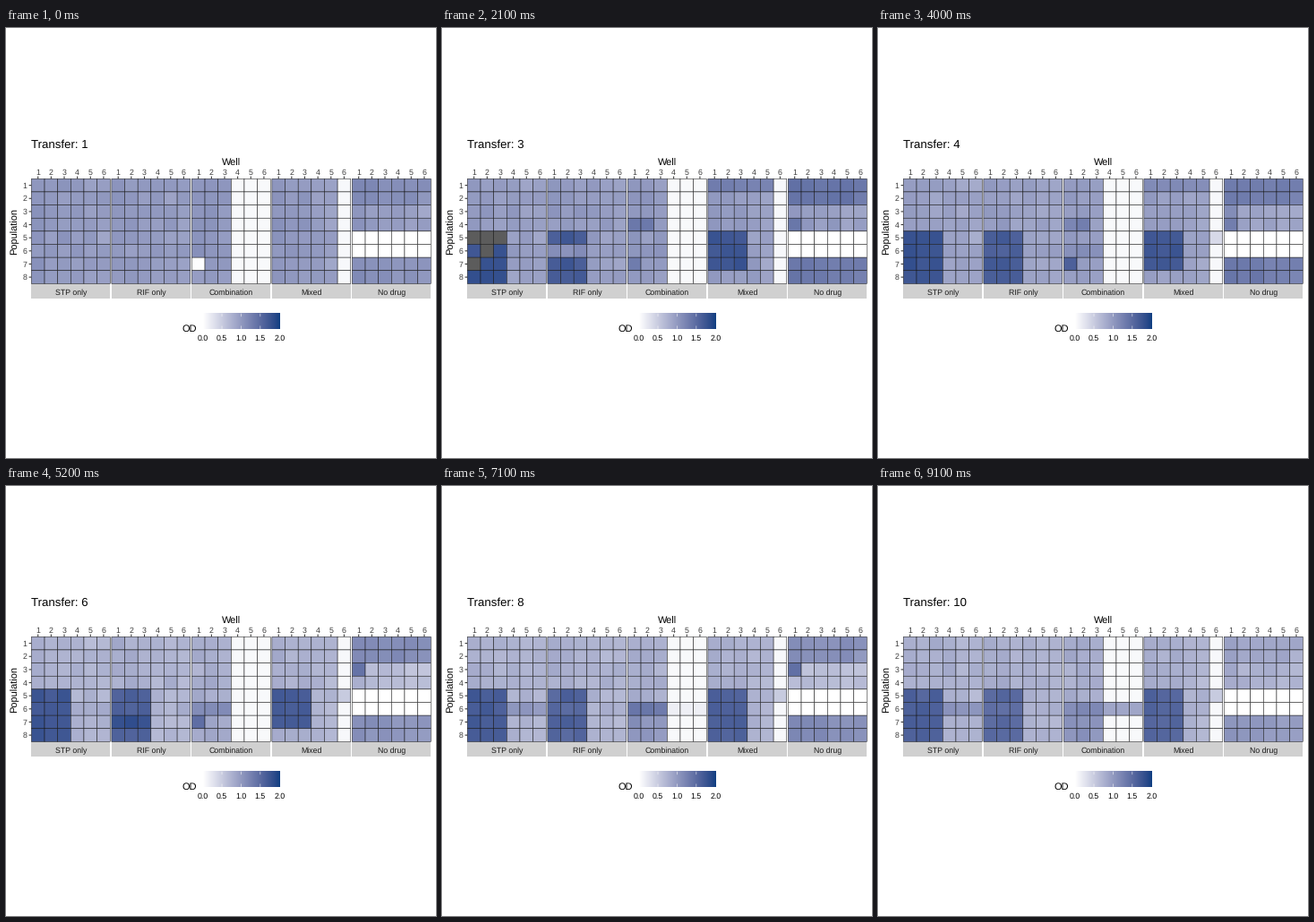
A matplotlib script for the animation above (10000 ms loop, 480x480 px).

```python
import numpy as np
import matplotlib.pyplot as plt
from matplotlib.animation import FuncAnimation
from matplotlib.collections import PolyCollection
from matplotlib.patches import Rectangle

plt.rcParams["font.family"] = "Liberation Sans"
plt.rcParams["text.hinting"] = "none"

SIZE, DPI = 480, 72
STATES, ROWS, COLS = 10, 8, 6
LEFT, TOP, CELL, PITCH = 28.4, 168.3, 14.64, 89.5
BOTTOM = TOP + ROWS * CELL
NAMES = ["STP only", "RIF only", "Combination", "Mixed", "No drug"]
STP, RIF, COMB, MIXED, NONE = range(5)

# ---------- colour: white to navy through CIE Lab ----------
M = np.array([[0.4124, 0.3576, 0.1805],
              [0.2126, 0.7152, 0.0722],
              [0.0193, 0.1192, 0.9505]])
WHITE_XYZ = M.sum(axis=1)


def to_lab(rgb):
    rgb = np.asarray(rgb, float)
    lin = np.where(rgb > 0.04045, ((rgb + 0.055) / 1.055) ** 2.4, rgb / 12.92)
    f = lin @ M.T / WHITE_XYZ
    f = np.where(f > 0.008856, np.cbrt(f), 7.787 * f + 16 / 116)
    x, y, z = np.moveaxis(f, -1, 0)
    return np.stack([116 * y - 16, 500 * (x - y), 200 * (y - z)], axis=-1)


def to_rgb(lab):
    L, a, b = np.moveaxis(lab, -1, 0)
    y = (L + 16) / 116
    f = np.stack([y + a / 500, y, y - b / 200], axis=-1)
    xyz = np.where(f > 0.2069, f ** 3, (f - 16 / 116) / 7.787) * WHITE_XYZ
    lin = np.clip(xyz @ np.linalg.inv(M).T, 0, 1)
    return np.clip(np.where(lin > 0.0031308,
                            1.055 * lin ** (1 / 2.4) - 0.055, 12.92 * lin), 0, 1)


PAPER = to_lab([1, 1, 1])
NAVY = to_lab(np.array([14, 63, 130]) / 255)
GREY = to_lab([0.36, 0.36, 0.36])


def od_lab(od):
    k = np.clip(np.nan_to_num(od) / 2, 0, 1)[..., None]
    return np.where(np.isnan(od)[..., None], GREY, PAPER + k * (NAVY - PAPER))


# ---------- growth model: od[transfer, panel, row, well] ----------
rng = np.random.default_rng(4)
T = np.arange(1, STATES + 1)[:, None, None]


def block(panel, rows, cols):
    """View of the wells in inclusive ranges that count from 1."""
    return od[:, panel, rows[0] - 1:rows[1], cols[0] - 1:cols[1]]


def pulse(panel, rows, cols, centre, width, height):
    wells = block(panel, rows, cols)
    wells += height * np.exp(-((T - centre) / width) ** 2)


def surge(panel, rows, onset, peak):
    """Resistant growth in wells 1-3: a jump, then a slow decline."""
    wells = block(panel, rows, (1, 3))
    wells[:] = np.where(T >= onset, peak - 0.025 * (T - onset), wells)


level = np.interp(T, [1, 4, 6, 10], [1.0, 0.97, 0.76, 0.78])
slope = 0.015 * (np.arange(COLS) - 1)
od = np.tile((level - slope)[:, None], (1, len(NAMES), ROWS, 1))

surge(STP, (5, 8), 3, 1.8)
surge(RIF, (5, 8), 3, 1.68)
surge(MIXED, (5, 7), 3, 1.72)
surge(MIXED, (8, 8), 8, 1.58)

pulse(STP, (6, 6), (4, 6), 9, 2.5, 0.3)
pulse(RIF, (6, 6), (1, 3), 3, 0.5, -0.55)
pulse(RIF, (7, 7), (1, 3), 6.5, 1.5, 0.2)
pulse(COMB, (4, 4), (1, 2), 3.5, 1.5, 0.4)
pulse(COMB, (6, 6), (1, 3), 8, 3, 0.55)
pulse(COMB, (7, 8), (1, 3), 9, 2.5, 0.3)
pulse(COMB, (7, 7), (1, 1), 5, 2, 0.75)
pulse(MIXED, (1, 1), (1, 5), 3.5, 1.2, 0.35)
pulse(NONE, (1, 2), (1, 6), 3, 2, 0.38)
pulse(NONE, (1, 2), (1, 6), 7, 2.5, 0.4)
pulse(NONE, (7, 8), (1, 6), 3.5, 2, 0.36)
pulse(NONE, (7, 8), (1, 6), 8, 3, 0.38)
pulse(NONE, (3, 4), (1, 6), 7, 2.5, -0.12)
pulse(NONE, (3, 3), (1, 1), 7, 2, 0.9)
pulse(NONE, (4, 4), (1, 1), 3.7, 1.8, 0.42)

# first resistant wells at the second transfer, with a fade across "No drug"
EARLY = {STP: [(5, 2), (6, 2), (7, 1), (8, 3)],
         RIF: [(5, 3), (7, 2), (7, 3), (8, 2), (8, 3)],
         MIXED: [(6, 3), (7, 2)]}
for panel, spots in EARLY.items():
    for r, c in spots:
        od[1, panel, r - 1, c - 1] = 1.52
od[1, NONE, [0, 1, 6, 7]] += np.linspace(0.25, -0.18, COLS)

od += rng.normal(0, 0.025, od.shape[1:]) + rng.normal(0, 0.025, od.shape)

# double-drug wells stay clear until a few recover; two rows are blank
block(COMB, (1, 8), (4, 6))[:] = 0.06
block(MIXED, (1, 8), (6, 6))[:] = 0.07
block(NONE, (5, 6), (1, 6))[:] = 0
block(COMB, (6, 6), (4, 6))[:] += 0.8 * np.clip((T - 7) / 3, 0, 1) ** 2
block(MIXED, (5, 5), (6, 6))[:] += 0.43 * np.clip((T - 3) / 2, 0, 1)
od[0, COMB, 6, 0] = 0.02

# readings above the scale at the third transfer
i, j = np.indices((3, 3))
od[2, STP, 4:7, :3][(i == 0) | (i + j == 2)] = np.nan

LAB = od_lab(od.reshape(STATES, -1))

# ---------- timing: (first moving frame, settled frame) per change ----------
SHIFTS = [(9, 10), (20, 21), (30, 32), (40, 42), (50, 52),
          (60, 62), (70, 71), (80, 82), (90, 91)]


def position(frame):
    return sum(np.clip((frame - a + 1) / (b - a + 1), 0, 1) for a, b in SHIFTS)


# ---------- static parts ----------
fig = plt.figure(figsize=(SIZE / DPI, SIZE / DPI), dpi=DPI, facecolor="white")
ax = fig.add_axes([0, 0, 1, 1])
ax.axis("off")


def label(x, y, s, size=8.8, color="black", ha="center", **kw):
    kw.setdefault("va", "baseline")
    return ax.text(x, y, s, fontsize=size, color=color, ha=ha, **kw)


def line(x0, y0, x1, y1, color="#333333", width=1.07):
    ax.plot([x0, x1], [y0, y1], color=color, lw=width,
            solid_capstyle="butt", snap=False)


INK = "#3C3C3C"
tiles = []
for p, name in enumerate(NAMES):
    x0 = LEFT + p * PITCH
    ax.add_patch(Rectangle((x0, BOTTOM), COLS * CELL, 17, fc="#D0D0D0", lw=0))
    label(x0 + COLS * CELL / 2, 298.2, name, color="#1A1A1A")
    for c in range(COLS):
        cx = x0 + (c + 0.5) * CELL
        line(cx, TOP - 2.75, cx, TOP)
        label(cx, 163.9, str(c + 1), color=INK)
    for r in range(ROWS):
        for c in range(COLS):
            x, y = x0 + c * CELL, TOP + r * CELL
            tiles.append([(x, y), (x + CELL, y), (x + CELL, y + CELL), (x, y + CELL)])

for r in range(ROWS):
    cy = TOP + (r + 0.5) * CELL
    line(LEFT - 2.75, cy, LEFT, cy)
    label(23.4, cy + 3.1, str(r + 1), color=INK, ha="right")

label(251.3, 153.6, "Well", 11)
label(10, 227, "Population", 11, rotation=90, va="center")
title = label(28.2, 134, "", 13.2, ha="left")

# colour bar
BAR_X, BAR_Y, BAR_W, BAR_H = 219.6, 318.7, 85.7, 17.2
ramp = to_rgb(od_lab(np.linspace(0, 2, 256)))[None]
ax.imshow(ramp, extent=(BAR_X, BAR_X + BAR_W, BAR_Y + BAR_H, BAR_Y),
          aspect="auto", interpolation="bilinear")
label(196.8, 338.8, "OD", 11, ha="left")
for k in range(5):
    x = BAR_X + BAR_W * k / 4
    label(x, 349.3, f"{k / 2:.1f}")
    if 0 < k < 4:
        for y in (BAR_Y, BAR_Y + BAR_H * 0.8):
            line(x, y, x, y + BAR_H / 5, "white", 0.5)

wells = PolyCollection(tiles, edgecolors="#111111", linewidths=0.5, zorder=3)
wells.set_snap(False)
ax.add_collection(wells, autolim=False)
ax.set(xlim=(0, SIZE), ylim=(SIZE, 0))


def draw(frame):
    pos = position(frame) + 1e-9
    now = min(int(pos), STATES - 1)
    after = min(now + 1, STATES - 1)
    wells.set_facecolor(to_rgb(LAB[now] + (pos - now) * (LAB[after] - LAB[now])))
    title.set_text(f"Transfer: {int(pos + 0.5) + 1}")
    return wells, title


anim = FuncAnimation(fig, draw, frames=100, interval=100,
                     init_func=lambda: draw(0), repeat=True, repeat_delay=0)
plt.show()
```
